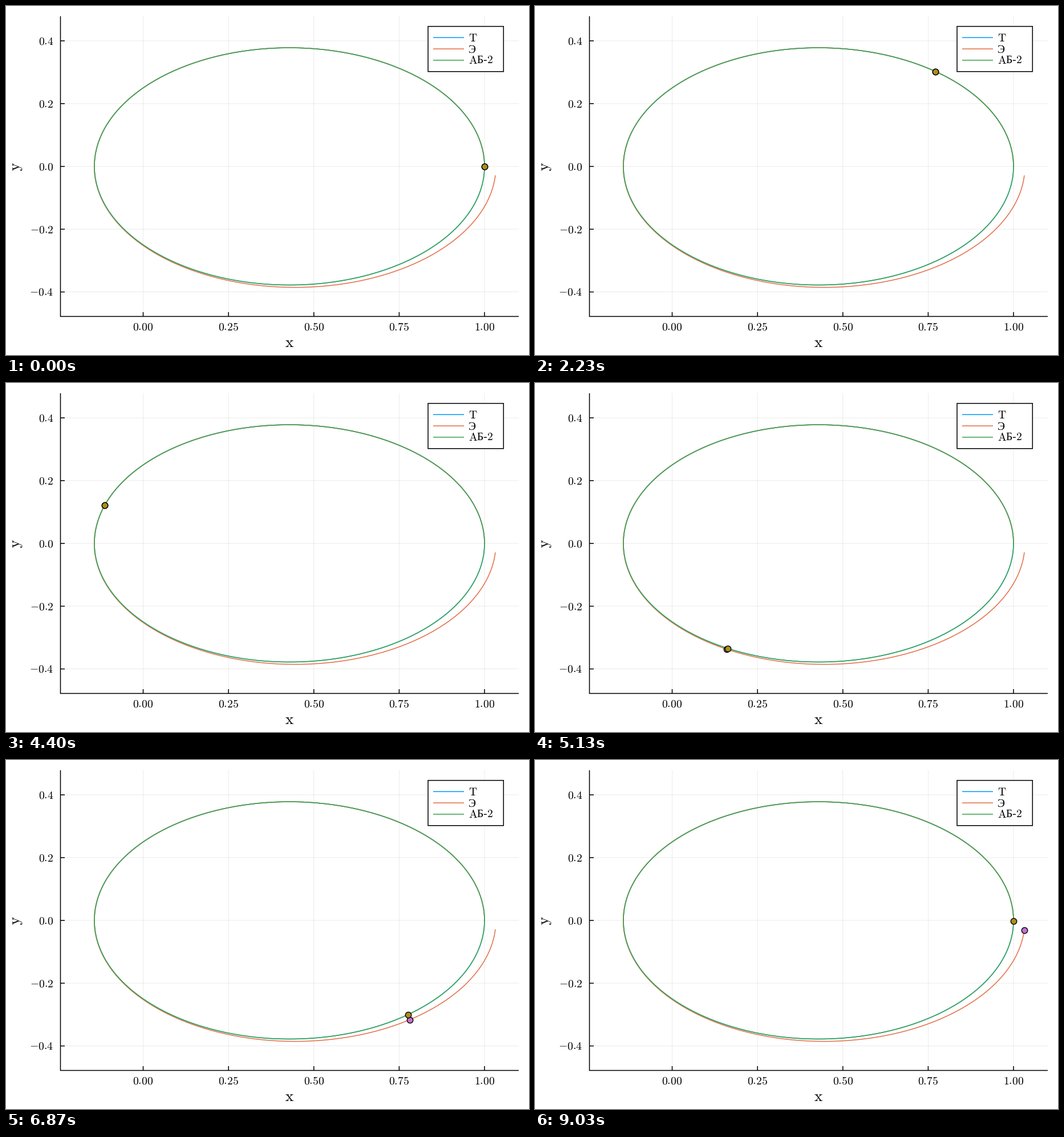
Animation of 917 by 611 pixels, one loop 9.06 s. Source, as a matplotlib script:

```python
import numpy as np
import matplotlib.pyplot as plt
from matplotlib.animation import FuncAnimation
from matplotlib.patches import Rectangle

W, H, DPI = 917, 611, 64
PT = 72 / DPI                       # points per pixel
FRAMES, LOOP = 272, 9060
DT, STEPS, STRIDE = 1e-4, 27140, 100

BLUE, ORANGE, GREEN = "#009AFA", "#E36F47", "#3EA44E"
PINK, GOLD = "#C371D2", "#AC8E18"
LEFT, RIGHT, TOP, BOTTOM = 95.5, 899, 18, 543.5
LINE = 1.53

plt.rcParams.update({
    "font.family": "Liberation Serif",
    "mathtext.fontset": "cm",
    "text.hinting": "none",
})


def to_px(z):
    """Map complex positions to stage pixels."""
    return 240.5 + 598.5 * np.real(z), 280.8 - 549.5 * np.imag(z)


def accel(z):
    return -z / abs(z) ** 3


def integrate(c_new, c_old):
    """Two-step explicit integration of the orbit around the origin."""
    z, v = 1 + 0j, 0.5j
    path = [z]
    old_v, old_a = v, accel(z)
    for _ in range(STEPS):
        a = accel(z)
        z, v, old_v, old_a = (z + DT * (c_new * v - c_old * old_v),
                              v + DT * (c_new * a - c_old * old_a), v, a)
        path.append(z)
    return np.array(path)


euler = integrate(1, 0)
adams = integrate(1.5, 0.5)

# Exact ellipse with one focus at the origin
ecc, semi = 0.75, 4 / 7
u = np.linspace(0, 2 * np.pi, 1200)
exact = semi * (np.cos(u) + ecc) + 1j * semi * np.sqrt(1 - ecc**2) * np.sin(u)

fig = plt.figure(figsize=(W / DPI, H / DPI), dpi=DPI, facecolor="white")
ax = fig.add_axes([0, 0, 1, 1])
ax.set_xlim(0, W)
ax.set_ylim(H, 0)
ax.axis("off")


def line(xs, ys, color="black", width=LINE, z=2, **kw):
    ax.plot(xs, ys, color=color, lw=width * PT, zorder=z, snap=False, **kw)


def label(x, y, s, size=19.6, **kw):
    ax.text(x, y, s, fontsize=size * PT, va="baseline", zorder=8, **kw)


def roman(s):
    return rf"$\mathrm{{{s}}}$"


# Grid, ticks and tick labels
for val in (0, 0.25, 0.5, 0.75, 1):
    x = to_px(val)[0]
    line([x, x], [TOP, BOTTOM], width=0.77, z=1, alpha=0.1)
    line([x, x], [BOTTOM, BOTTOM - 7.5], solid_capstyle="butt")
    label(x, 567.3, roman(f"{val:.2f}"), ha="center")
for val in (-0.4, -0.2, 0, 0.2, 0.4):
    y = to_px(1j * val)[1]
    line([LEFT, RIGHT], [y, y], width=0.77, z=1, alpha=0.1)
    line([LEFT, LEFT + 7.5], [y, y], solid_capstyle="butt")
    label(83, y + 6.4, roman(f"{val:.1f}"), ha="right")

line([LEFT, LEFT, RIGHT], [TOP, BOTTOM, BOTTOM], solid_capstyle="butt",
     solid_joinstyle="miter")
label(497, 597.2, roman("x"), 27, ha="center")
label(24.5, 281, roman("y"), 27, ha="center", rotation=90,
      rotation_mode="anchor")

# Trajectories
line(*to_px(exact), BLUE, z=3)
line(*to_px(euler[::20]), ORANGE, z=4)
line(*to_px(adams[::20]), GREEN, z=5)

# Legend
ax.add_patch(Rectangle((740, 35.7), 132.3, 79.1, fc="white", ec="black",
                       lw=LINE * PT, zorder=6, snap=False))
entries = [(BLUE, roman("T")), (ORANGE, "Э"),
           (GREEN, roman("A") + "Б-" + roman("2"))]
for i, (color, name) in enumerate(entries):
    y = 55.3 + 19.8 * i
    line([749, 803], [y, y], color, z=7, solid_capstyle="butt")
    label(811, y + 6.5, name)


def marker(color, z):
    dot, = ax.plot([], [], "o", mfc=color, mec="black", ms=10.4 * PT,
                   mew=1.4 * PT, zorder=z, snap=False)
    return dot


dots = [(marker(PINK, 9), euler), (marker(GOLD, 10), adams)]


def update(frame):
    for dot, path in dots:
        x, y = to_px(path[frame * STRIDE])
        dot.set_data([x], [y])
    return [dot for dot, _ in dots]


anim = FuncAnimation(fig, update, frames=FRAMES, interval=LOOP / FRAMES,
                     repeat=True, repeat_delay=0)
plt.show()
```
